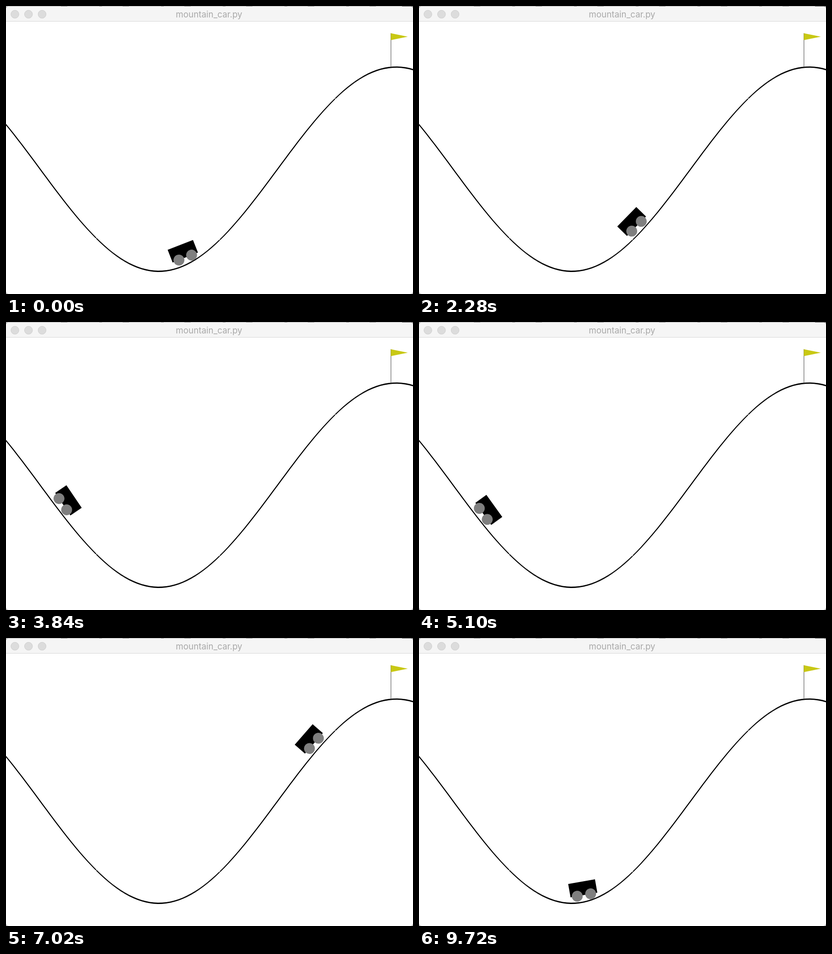
Write an HTML page that moves like this. It is 890x629 px and loops after 9.78 s.

```html
<!DOCTYPE html>
<html lang="en">
<head>
<meta charset="utf-8">
<title>mountain_car.py</title>
<style>
  html, body { margin: 0; width: 100%; height: 100%; overflow: hidden; background: #fff; }
  svg { display: block; width: 890px; height: 629px; }
  .title { font: 18.8px Inter, Roboto, sans-serif; fill: #a8a8a8; text-anchor: middle; }
  .lights circle { fill: #dcdcdc; stroke: #cecece; }
  .wheel { fill: #7f7f7f; }
</style>
</head>
<body>
<svg viewBox="0 0 890 629">
  <rect width="890" height="629" fill="#b4b4b4"/>
  <path d="M120 .5H860" stroke="#777" stroke-dasharray="14 70 6 45"/>
  <path d="M866 .5H890" stroke="#444"/>
  <rect y="1" width="890" height="628" rx="6" fill="#fff"/>
  <path d="M0 34V7a6 6 0 0 1 6-6H884a6 6 0 0 1 6 6V34z" fill="#f5f5f5"/>
  <rect y="33" width="890" height="1" fill="#d6d6d6"/>
  <g class="lights">
    <circle cx="19.5" cy="18" r="8.7"/>
    <circle cx="49.2" cy="18" r="8.7"/>
    <circle cx="78.9" cy="18" r="8.7"/>
  </g>
  <text class="title" x="444" y="25">mountain_car.py</text>

  <path id="track"/>
  <g id="flag">
    <path d="M.2 0V-50" stroke="#444" stroke-width=".7"/>
    <path d="M0-50V-40L25-45z" fill="#c8c814"/>
  </g>
  <g id="car">
    <rect x="-20" y="-30" width="40" height="20"/>
    <circle class="wheel" cx="-10" cy="-10" r="8"/>
    <circle class="wheel" cx="10" cy="-10" r="8"/>
  </g>
</svg>
<script>
const ZOOM = 1.4868, WORLD = ZOOM * 600 / 1.8;
const WALL = -1.2, LENGTH = 1.8, GOAL = 0.5, RESTART = -0.465;
const STEP = 60, STEPS = 163;

const toX = p => (p - WALL) * WORLD - 1;
const toY = p => 629 - (Math.sin(3 * p) * 0.45 + 0.55) * WORLD;

function place(id, p, angle = 0) {
  document.getElementById(id).setAttribute('transform',
    `translate(${toX(p)} ${toY(p)}) rotate(${angle}) scale(${ZOOM})`);
}

// Unsmoothed thick line: each segment is widened along its minor axis.
function trackPath(count, half) {
  let d = '';
  for (let i = 0; i < count; i++) {
    const a = WALL + LENGTH * i / count, b = a + LENGTH / count;
    const x0 = toX(a), y0 = toY(a), x1 = toX(b), y1 = toY(b);
    const steep = Math.abs(y1 - y0) > Math.abs(x1 - x0);
    const ox = steep ? half : 0, oy = steep ? 0 : half;
    const corners = [[x0 - ox, y0 - oy], [x1 - ox, y1 - oy], [x1 + ox, y1 + oy], [x0 + ox, y0 + oy]];
    if (steep && y1 < y0) corners.reverse();
    d += 'M' + corners.map(c => c.map(n => n.toFixed(2)).join(' ')).join('L') + 'z';
  }
  return d;
}

// Each swing: start step, start position, end step, end position.
// The wall stops one swing early, the goal stops the last.
const SWINGS = [
  [0, -0.396, 23, -0.665],
  [23, -0.665, 43, -0.14],
  [43, -0.14, 73.3, WALL],
  [73.3, WALL, 114.5, 0.204],
  [114.5, 0.204, 150, -1.5],
  [140.2, WALL, 168.9, 0.8]
];

function position(step) {
  const [t0, from, t1, to] = SWINGS.filter(s => s[0] <= step).pop();
  const ease = (1 - Math.cos(Math.PI * (step - t0) / (t1 - t0))) / 2;
  const p = Math.max(WALL, from + (to - from) * ease);
  return p < GOAL ? p : RESTART;
}

function draw() {
  const p = position(Math.floor(performance.now() / STEP) % STEPS);
  place('car', p, -Math.cos(3 * p) * 180 / Math.PI);
  requestAnimationFrame(draw);
}

document.getElementById('track').setAttribute('d', trackPath(99, 1.45));
place('flag', GOAL);
draw();
</script>
</body>
</html>
```
